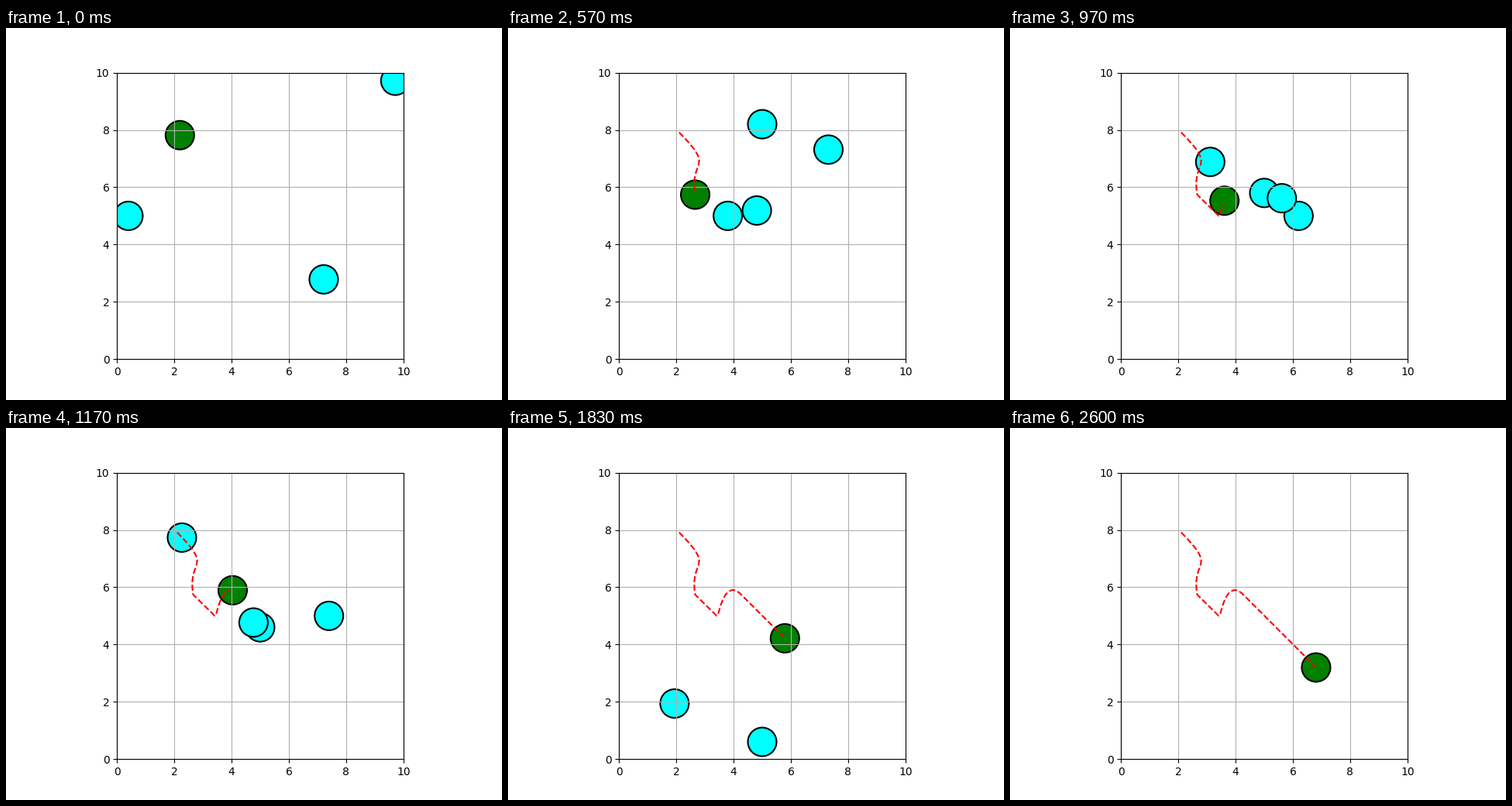
These frames come from a looping animation (640 px wide and 480 px high, 2630 ms). A matplotlib script:

```python
from math import comb

import numpy as np
import matplotlib.pyplot as plt
from matplotlib.animation import FuncAnimation
from matplotlib.patches import Circle

LOOP_MS = 2630
TICK_MS = 10
STEPS_PER_SEC = 30
RADIUS = 0.5
SPEED = 0.2

# Obstacles: start point and heading in degrees
OBSTACLES = [((0, 5), 0), ((5, 12), -90), ((10, 10), -135), ((7.5, 2.5), 135)]

# Robot: steps taken and Bezier control points of each leg
LEGS = [
    (18, [(2.1, 7.914), (3.4, 6.6), (2.45, 7.036), (2.66, 5.74)]),
    (6.3, [(2.66, 5.74), (3.444, 4.97)]),
    (14.3, [(3.444, 4.97), (3.634, 5.825), (3.9, 6.11), (4.26, 5.75)]),
]
GOAL = np.array([7.65, 2.36])
DECAY = 0.966


def bezier(points, s):
    n = len(points) - 1
    return sum(comb(n, i) * (1 - s) ** (n - i) * s ** i * np.array(p)
               for i, p in enumerate(points))


def along(points, share):
    """Point at the given share of a Bezier curve's length."""
    curve = bezier(points, np.linspace(0, 1, 200)[:, None])
    length = np.append(0, np.cumsum(np.hypot(*np.diff(curve, axis=0).T)))
    return np.array([np.interp(share * length[-1], length, c) for c in curve.T])


def robot_at(step):
    for steps, points in LEGS:
        if step <= steps:
            return along(points, step / steps)
        step -= steps
    # Past the last leg the gap to the goal shrinks exponentially
    return GOAL + (np.array(points[-1]) - GOAL) * DECAY ** step


def step_at(tick):
    """Whole motion steps done at a tick, rounding step times to ticks."""
    return int((tick + 0.5) * TICK_MS * STEPS_PER_SEC / 1000)


ticks = LOOP_MS // TICK_MS
path = np.array([robot_at(step) for step in range(step_at(ticks) + 2)])

fig, ax = plt.subplots(figsize=(6.4, 4.8), dpi=100)
ax.set(xlim=(0, 10), ylim=(0, 10), aspect="equal")
ax.grid(True)


def add_disc(color):
    return ax.add_patch(Circle((0, 0), RADIUS, facecolor=color,
                               edgecolor="black", linewidth=1.5))


robot = add_disc("green")
obstacles = [add_disc("cyan") for _ in OBSTACLES]
trail, = ax.plot([], [], "r--", linewidth=1.5)


def update(tick):
    n = step_at(tick)
    robot.center = path[n + 1]
    for disc, ((x, y), heading) in zip(obstacles, OBSTACLES):
        angle = np.radians(heading)
        dist = SPEED * (n + 2)
        disc.center = x + dist * np.cos(angle), y + dist * np.sin(angle)
    # The trail lags the robot by one step
    trail.set_data(*path[:n + 1].T)
    return [robot, *obstacles, trail]


anim = FuncAnimation(fig, update, frames=ticks, interval=TICK_MS,
                     repeat=True, repeat_delay=0)
plt.show()
```
